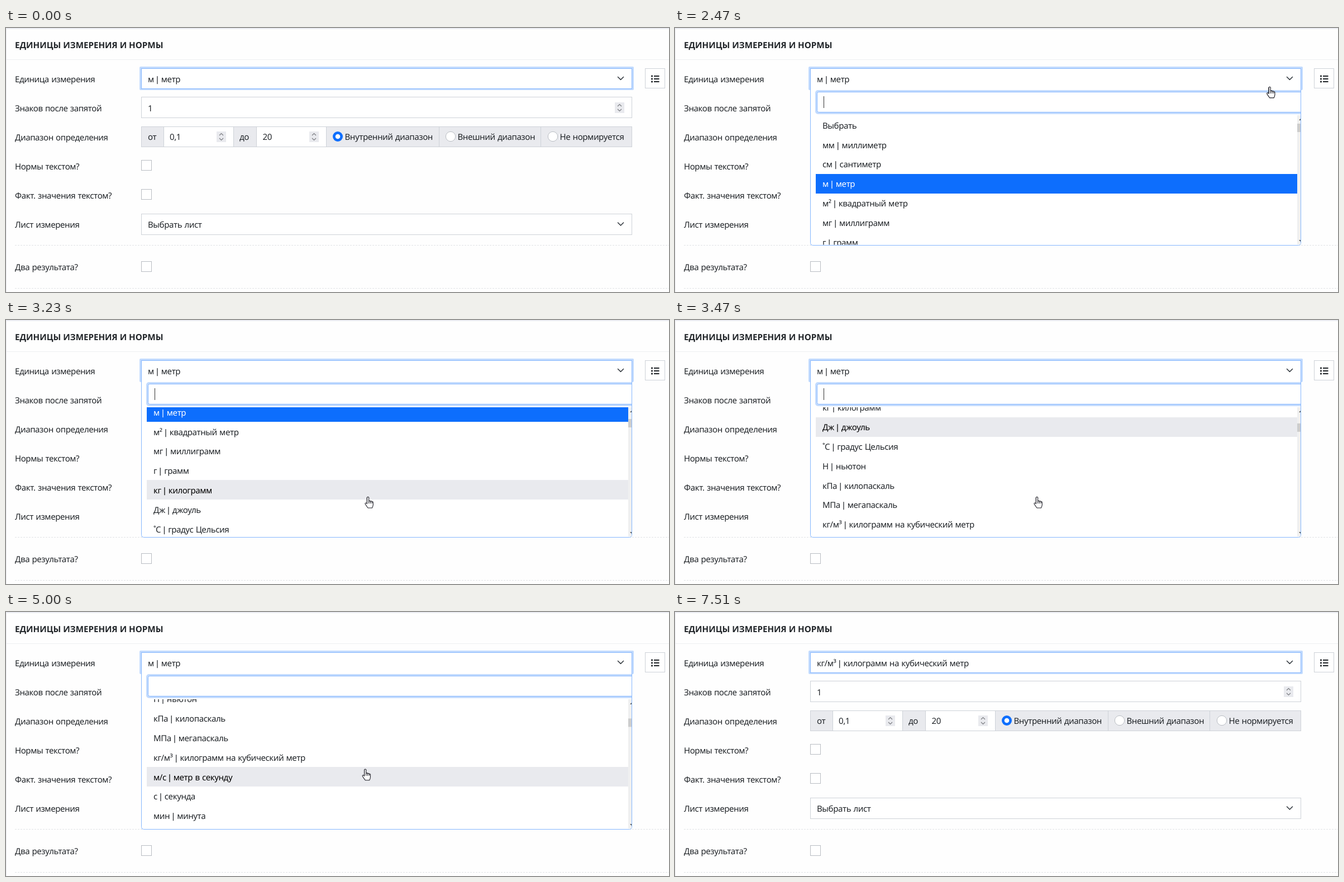
Animation of 1187x472 px, one loop 7.86 s. Source, as an HTML page:

```html
<!DOCTYPE html>
<html lang="ru">
<head>
<meta charset="utf-8">
<title>Единицы измерения</title>
<style>
  html, body { margin: 0; width: 100%; height: 100%; overflow: hidden; background: #fefefe; }
  svg { display: block; }
  text { font-family: "Noto Sans", "Open Sans", sans-serif; letter-spacing: -.42px; word-spacing: .8px; text-rendering: geometricPrecision; }
  .bar { font-family: "Liberation Sans", Arial, sans-serif; letter-spacing: .6px; }
  .title { font-size: 15.2px; font-weight: 700; letter-spacing: 0; word-spacing: 0; }
  #list rect { shape-rendering: crispEdges; }
</style>
</head>
<body>
<svg id="stage" width="1187" height="472" font-size="15" fill="#212529"></svg>
<script>
const LOOP = 7860, ROW = 34.8, LIST_TOP = 156.3, SELECTED = 3, CHOSEN = 13;
const BORDER = '#ced2d8', FOCUS = '#86b7fe', HALO = '#c2dbfe', GREY = '#e9eaee', BLUE = '#0d6efd';
const units = ['Выбрать', 'мм | миллиметр', 'см | сантиметр', 'м | метр', 'м² | квадратный метр',
  'мг | миллиграмм', 'г | грамм', 'кг | килограмм', 'Дж | джоуль', '˚С | градус Цельсия', 'Н | ньютон',
  'кПа | килопаскаль', 'МПа | мегапаскаль', 'кг/м³ | килограмм на кубический метр',
  'м/с | метр в секунду', 'с | секунда', 'мин | минута'];

// Markup helpers
const withBar = s => s.replace('|', '<tspan class="bar">|</tspan>');
const text = (x, y, s, attrs = '') => `<text x="${x}" y="${y}" ${attrs}>${withBar(s)}</text>`;
const rect = (x, y, w, h, fill, attrs = '') =>
  `<rect x="${x}" y="${y}" width="${w}" height="${h}" fill="${fill}" ${attrs}/>`;
const box = (x, y, w, h, fill = '#fff', stroke = BORDER, attrs = '') =>
  rect(x + .5, y + .5, w - 1, h - 1, fill, `stroke="${stroke}" ${attrs}`);
const line = (d, color, width = 1, attrs = '') =>
  `<path d="${d}" fill="none" stroke="${color}" stroke-width="${width}" ${attrs}/>`;
const clip = (x, y, w, h, content) =>
  `<svg x="${x}" y="${y}" width="${w}" height="${h}" viewBox="${x} ${y} ${w} ${h}">${content}</svg>`;
const chevron = y => line(`M1095.5 ${y - 2.5}l5 5l5-5`, '#343a40', 1.6, 'stroke-linecap="round" stroke-linejoin="round"');
const spinner = (x, y) => rect(x, y, 17, 19, GREY) +
  line(`M${x + 5} ${y + 7}l3.5-3.5l3.5 3.5m-7 5l3.5 3.5l3.5-3.5`, '#7b7d82', 1.2);
const checkbox = y => box(242, y, 19, 19, '#fff', '#b9bdc3');
const radio = (x, on) => `<circle cx="${x}" cy="194" r="${on ? 9 : 8.7}" fill="${on ? BLUE : '#fff'}"` +
  ` stroke="${on ? 'none' : '#b9bdc3'}"/>` + (on ? `<circle cx="${x}" cy="194" r="4.3" fill="#fff"/>` : '');
const dashes = y => line(`M16 ${y}H1187`, '#e1e3e6', 1, 'stroke-dasharray="3 2"');

const labels = [[97, 'Единица измерения'], [149, 'Знаков после запятой'], [201, 'Диапазон определения'],
  [253, 'Нормы текстом?'], [305, 'Факт. значения текстом?'], [357, 'Лист измерения'], [433, 'Два результата?']];

const form =
  rect(0, 0, 1187, 472, '#fefefe') + rect(0, 0, 1187, 2, '#ecedf3') + rect(0, 2, 1, 470, '#ececf0') +
  rect(1, 56, 1186, 1, '#eeeff1') +
  text(16, 36, 'ЕДИНИЦЫ ИЗМЕРЕНИЯ И НОРМЫ', 'class="title"') +
  labels.map(([y, s]) => text(16, y, s)).join('') +
  rect(239, 69, 885, 42, HALO, 'rx="2"') + box(242, 72, 879, 37, '#fff', FOCUS) +
  box(1144, 72, 36, 36) +
  [86, 91, 96].map(y => rect(1155, y - 1.5, 3, 3, '#212529', 'rx="1"') + rect(1160, y - 1, 9.5, 2, '#212529')).join('') +
  box(242, 123, 879, 38) + text(254, 149, '1') + spinner(1090, 133) +
  box(242, 176, 879, 37, GREY) + box(282, 176, 126, 37) + box(448, 176, 126, 37) +
  line('M775.5 177V212M957.5 177V212', BORDER) +
  text(254, 200, 'от') + text(293, 200, '0,1') + spinner(377, 185) +
  text(418, 200, 'до') + text(459.5, 200, '20') + spinner(543, 185) +
  radio(594, true) + text(606.5, 200, 'Внутренний диапазон') +
  radio(796) + text(808.5, 200, 'Внешний диапазон') +
  radio(979) + text(991.5, 200, 'Не нормируется') +
  checkbox(236) + checkbox(288) + checkbox(417) +
  box(242, 332, 879, 38) + text(254, 357, 'Выбрать лист') + chevron(350.5) +
  dashes(388.5) + dashes(465.5);

const rowTop = i => LIST_TOP + i * ROW;
const list =
  `<g id="list">${rect(252, 0, 862, ROW, GREY, 'id="hover"')}${rect(252, rowTop(SELECTED), 862, ROW, BLUE)}` +
  units.map((s, i) => text(264, rowTop(i) + 23.5, s, 'class="unit"')).join('') + '</g>';

const dropdown = '<g id="dropdown">' +
  `<path d="M242.5 107V384.500q0 4 4 4H1116.500q4 0 4-4V107" fill="#fff" stroke="${FOCUS}"/>` +
  clip(243, 107, 877, 281,
    rect(251, 111, 900, 43, HALO, 'rx="5"') + box(254, 114, 900, 37, '#fff', FOCUS, 'rx="3"') +
    rect(266, 122, 1, 21, '#333', 'id="caret"') +
    rect(1114, 156, 6, 231, '#f0f0f0') + rect(1114, 0, 6, 15, '#cdcdcd', 'id="thumb"') +
    '<path d="M1117 165l3-3v3zM1117 379l3 3v-3z" fill="#505050"/>') +
  clip(252, 156, 862, 231.5, list) + '</g>';

const pointers = '<g id="pointer" fill="#fff" stroke="#1c1c24" stroke-width="1.1" stroke-linejoin="round">' +
  '<g id="hand"><path d="M-1.600 1.400Q0-.8 1.600 1.400V7.500L3.400 7.200Q4.200 7.200 4.400 8L6.400 7.900Q7 8 7.200 9' +
  'Q9.200 8.600 9.300 10.200V14Q9.200 17 7.500 20H0Q-2 17.500-4.800 13Q-5.400 11.500-4 11Q-2.800 10.800-1.600 12.400Z"/>' +
  '<path d="M-1.600 1.400V12.500M1.600 7.500V12M4.400 8V12M7.200 9V12" fill="none"/></g>' +
  '<path id="arrow" d="M0 0V16L3.700 12.500L6.200 18.500L8.600 17.400L6.200 11.600H11.300Z"/></g>';

document.getElementById('stage').innerHTML =
  form + text(254, 97, '', 'id="value"') + chevron(90) + dropdown + pointers;
const $ = id => document.getElementById(id);
const unitTexts = document.querySelectorAll('.unit');
const show = (id, on) => $(id).setAttribute('visibility', on ? 'inherit' : 'hidden');
const move = (id, x, y) => $(id).setAttribute('transform', `translate(${x} ${y})`);

// Progress in n equal hard steps, the first at start and the last at end
const steps = (t, start, end, n) =>
  t < start ? 0 : Math.min(n, Math.floor((t - start) / (end - start) * (n - 1) + 1e-6) + 1) / n;

const moves = [
  { start: 1000, end: 1540, n: 10, from: [1195, 434], to: [1098, 88], ease: p => Math.sin(p * Math.PI / 2) },
  { start: 2470, end: 2730, n: 6, from: [1098, 88], to: [648, 316], ease: p => p * p * (3 - 2 * p) },
  { start: 4440, end: 5240, n: 13, from: [648, 316], to: [641, 265], ease: p => p },
  { start: 7110, end: 7510, n: 8, from: [642, 267], to: [1238, 511], ease: p => p ** 1.5 },
];

function pointerAt(t) {
  const m = moves.filter(m => t >= m.start).pop() || moves[0];
  const p = m.ease(steps(t, m.start, m.end, m.n));
  return m.from.map((a, i) => a + (m.to[i] - a) * p);
}

function scrollAt(t) {
  const s = steps(t, 3110, 3770, 12) * 12;
  if (s <= 3) return 113.5 * (s / 3) ** 1.2;
  if (s <= 7) return 113.5 + 147.5 * (s - 3) / 4;
  return 261 + 105.5 * Math.sin((s - 7) / 5 * Math.PI / 2);
}

const caretOn = t => [[2200, 2730], [3230, 3770], [4240, 4740], [5240, 5780]].some(([a, b]) => t >= a && t < b);

function draw(t) {
  const open = t >= 2200 && t < 5980;
  const [x, y] = pointerAt(t);
  const scroll = scrollAt(t);
  // Hover lags behind while the list is scrolling fast
  const hoverScroll = t >= 3290 && t < 3770 ? 145 : scroll;
  const hovered = y > LIST_TOP && x < 1114 ? Math.floor((y - LIST_TOP + hoverScroll) / ROW) : -1;

  $('value').innerHTML = withBar(units[t < 5980 ? SELECTED : CHOSEN]);
  show('dropdown', open);
  show('caret', caretOn(t));
  show('hover', hovered >= 0);
  $('hover').setAttribute('y', rowTop(hovered));
  unitTexts.forEach((el, i) => el.setAttribute('fill', i === SELECTED ? '#fff' : i === hovered ? '#000' : '#212529'));
  move('list', 0, -scroll);
  $('thumb').setAttribute('y', 171 + scroll * .053);

  const hand = open || y < 109;
  show('pointer', t >= 1000 && t < 7510);
  show('hand', hand);
  show('arrow', !hand);
  move('pointer', x, y);
}

const began = performance.now();
function tick() {
  draw((performance.now() - began) % LOOP);
  requestAnimationFrame(tick);
}
tick();
</script>
</body>
</html>
```
